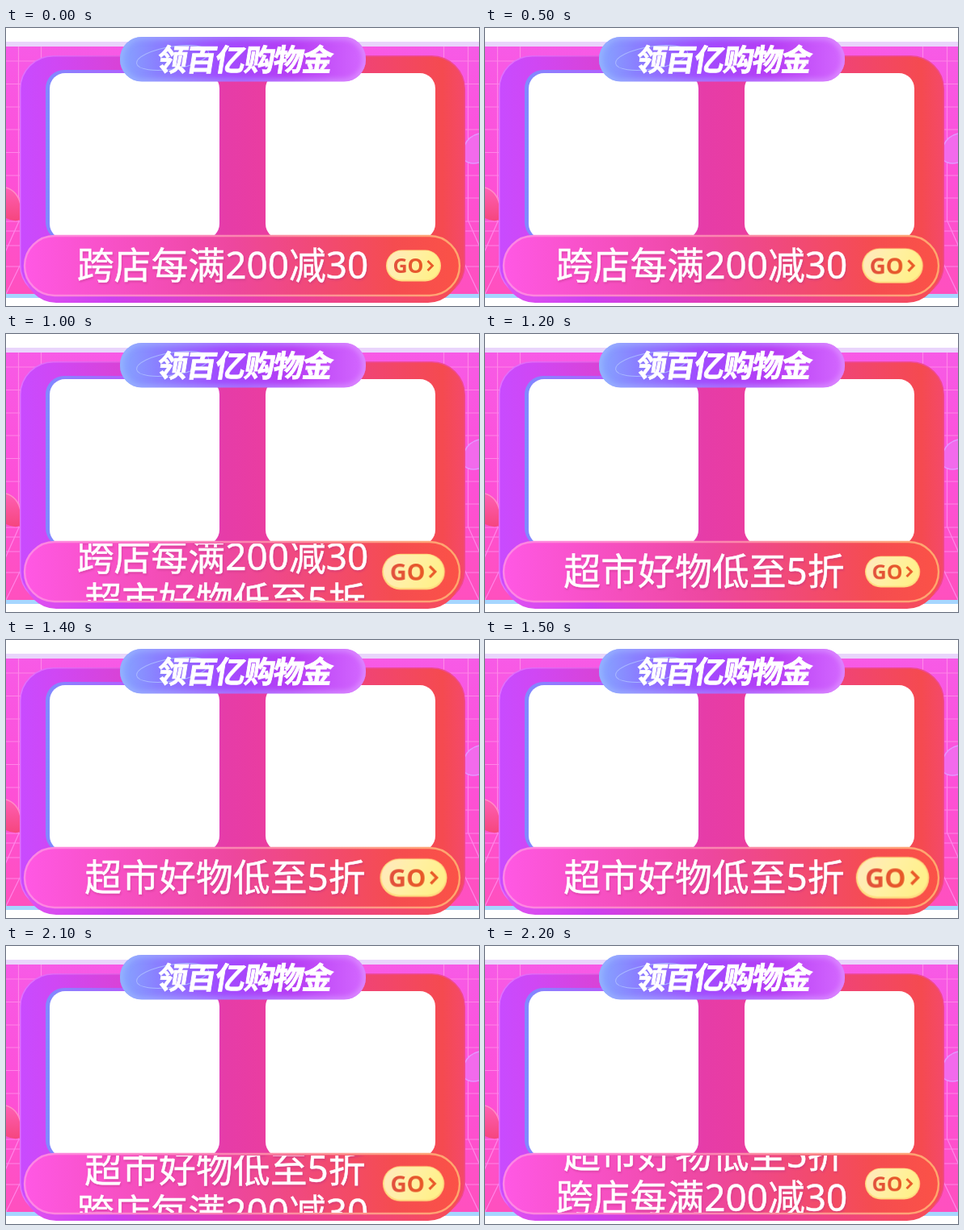
These frames come from a looping animation (585 by 345 pixels, 2.3 s). An HTML page:

```html
<!DOCTYPE html>
<html lang="zh-CN">
<head>
<meta charset="utf-8">
<title>领百亿购物金</title>
<style>
  html, body { margin: 0; width: 100%; height: 100%; overflow: hidden; background: #fff; }
  svg { display: block; width: 585px; height: 345px; }
  text { font-family: "Noto Sans", "Noto Sans CJK SC", "Noto Sans CJK", sans-serif; }
  .title { font: 900 37.4px "Noto Sans CJK SC", "Noto Sans CJK", sans-serif; letter-spacing: -1.5px; fill: #fff; stroke: #fff; stroke-width: .9; }
  .offer { font-size: 45.9px; fill: #fff; stroke: #fff; stroke-width: .5; text-anchor: middle; }
  .offer text { filter: drop-shadow(1px 2px 1px #b9308066); }
  .go text { font: 700 25px "Open Sans", sans-serif; fill: url(#goText); }

  .first, .second, .go { animation: 2300ms step-end infinite; }
  .first { animation-name: first; }
  .second { animation-name: second; }
  .go { animation-name: pulse; transform-origin: 504px 295px; }

  @keyframes first {
    0% { transform: translateY(0); }
    43.47% { transform: translateY(-18px); }
    47.82% { transform: translateY(-36px); }
    52.17% { transform: translateY(-80px); }
    91.30% { transform: translateY(36px); }
    95.65% { transform: translateY(18px); }
    100% { transform: translateY(0); }
  }
  @keyframes second {
    0% { transform: translateY(80px); }
    43.47% { transform: translateY(36px); }
    47.82% { transform: translateY(18px); }
    52.17% { transform: translateY(0); }
    91.30% { transform: translateY(-18px); }
    95.65% { transform: translateY(-36px); }
    100% { transform: translateY(80px); }
  }
  @keyframes pulse {
    0% { transform: scale(1); }
    21.73% { transform: scale(1.11); }
    26.08% { transform: scale(1.22); }
    30.43% { transform: scale(1.33); }
    39.13% { transform: scale(1.24); }
    43.47% { transform: scale(1.14); }
    47.82% { transform: scale(1.07); }
    52.17% { transform: scale(1); }
    56.52% { transform: scale(1.11); }
    60.86% { transform: scale(1.22); }
    65.21% { transform: scale(1.33); }
    82.60% { transform: scale(1.24); }
    91.30% { transform: scale(1.12); }
    95.65%, 100% { transform: scale(1); }
  }
</style>
</head>
<body>
<svg viewBox="0 0 585 345">
  <defs>
    <linearGradient id="backdrop" x2="0" y2="1">
      <stop stop-color="#f75ae6"/><stop offset=".5" stop-color="#fd50d8"/><stop offset="1" stop-color="#ff50be"/>
    </linearGradient>
    <linearGradient id="panel">
      <stop stop-color="#c84bff"/><stop offset=".08" stop-color="#d047f4"/>
      <stop offset=".46" stop-color="#e63ca8"/><stop offset=".56" stop-color="#ea3da0"/>
      <stop offset=".95" stop-color="#f54a50"/><stop offset="1" stop-color="#f4496a"/>
    </linearGradient>
    <linearGradient id="panelEdge">
      <stop stop-color="#e070ff"/><stop offset=".5" stop-color="#e84bc0"/><stop offset="1" stop-color="#f0488c"/>
    </linearGradient>
    <linearGradient id="cardEdge">
      <stop stop-color="#7f8aff"/><stop offset=".45" stop-color="#b060ff"/><stop offset="1" stop-color="#e03cb8"/>
    </linearGradient>
    <linearGradient id="ribbon">
      <stop stop-color="#86a6ff"/><stop offset=".15" stop-color="#8a80ff"/><stop offset=".4" stop-color="#a04cff"/>
      <stop offset=".7" stop-color="#b63cf4"/><stop offset="1" stop-color="#d468ff"/>
    </linearGradient>
    <linearGradient id="ribbonEdge">
      <stop stop-color="#96b4ff"/><stop offset=".5" stop-color="#a878ff"/><stop offset="1" stop-color="#e08cff"/>
    </linearGradient>
    <linearGradient id="bar">
      <stop stop-color="#ff58e4"/><stop offset=".48" stop-color="#ed479e"/>
      <stop offset=".85" stop-color="#f54c50"/><stop offset="1" stop-color="#fb5247"/>
    </linearGradient>
    <linearGradient id="barEdge">
      <stop stop-color="#ff86e6"/><stop offset=".5" stop-color="#fb86b0"/><stop offset="1" stop-color="#ffa86c"/>
    </linearGradient>
    <linearGradient id="barRim">
      <stop stop-color="#e052f0"/><stop offset=".2" stop-color="#cc40f0"/>
      <stop offset=".55" stop-color="#e83ca8"/><stop offset="1" stop-color="#f74e54"/>
    </linearGradient>
    <linearGradient id="goFill" x2="1" y2=".3">
      <stop stop-color="#ffe8c0"/><stop offset=".5" stop-color="#fff0a6"/><stop offset="1" stop-color="#fff08c"/>
    </linearGradient>
    <linearGradient id="goText">
      <stop stop-color="#e2503f"/><stop offset="1" stop-color="#e95b26"/>
    </linearGradient>
    <linearGradient id="candy" x2="0" y2="1">
      <stop stop-color="#ff5fb4"/><stop offset="1" stop-color="#f5467e"/>
    </linearGradient>
    <filter id="soft"><feGaussianBlur stdDeviation="3"/></filter>
    <clipPath id="stageBand"><rect y="23" width="585" height="307"/></clipPath>
    <clipPath id="ribbonShape"><rect x="141" y="11" width="304" height="55.500" rx="27"/></clipPath>
    <clipPath id="barInside"><rect x="25" y="260" width="534" height="70.500" rx="35"/></clipPath>
  </defs>

  <!-- backdrop -->
  <rect y="17" width="585" height="318" fill="#e9d5fb"/>
  <rect y="329" width="585" height="6" fill="#a6d6ff"/>
  <g clip-path="url(#stageBand)">
    <rect y="23" width="585" height="307" fill="url(#backdrop)"/>
    <g fill="none" stroke="#ff86e8" stroke-width="1.200">
      <path d="M0 41H585M0 69.500H585M0 98H585M0 126H585M0 154.500H585M0 183H585M0 211H585M0 240H585"/>
      <path d="M15.500 23V240M43.500 23V40M541.500 23V40M571.500 23V240"/>
      <path d="M16 240L-4 285M44 240L0 330M572 240L592 285M542 240L585 330M0 252H585M0 270H585M0 296H585"/>
    </g>
    <path d="M0 198Q14 202 18 219V238Q10 241 0 236Z" fill="url(#candy)"/>
    <path d="M0 198Q14 202 18 219" fill="none" stroke="#ff8cc8" stroke-width="1.500"/>
    <path d="M585 131Q572 134 567 146V164Q574 170 585 167Z" fill="#f26aec"/>
    <path d="M585 131Q572 134 567 146M567 164Q574 170 585 167" fill="none" stroke="#e596ff" stroke-width="1.500"/>
  </g>

  <!-- panel and cards -->
  <rect x="17.700" y="34.700" width="549.600" height="300" rx="41" fill="url(#panel)" stroke="url(#panelEdge)" stroke-width="1.500"/>
  <rect x="49" y="52" width="216" height="212" rx="23" fill="url(#cardEdge)"/>
  <g fill="#fff">
    <rect x="54" y="56" width="210" height="206" rx="19"/>
    <rect x="321" y="56" width="210" height="206" rx="19"/>
  </g>

  <!-- ribbon -->
  <g clip-path="url(#ribbonShape)">
    <rect x="141" y="11" width="304" height="55.500" fill="url(#ribbon)"/>
    <rect x="141" y="11" width="304" height="55.500" rx="27" fill="none" stroke="url(#ribbonEdge)" stroke-width="7" filter="url(#soft)"/>
  </g>
  <ellipse cx="206" cy="37" rx="45" ry="14" transform="rotate(-9 206 37)" fill="none" stroke="#a9b8ff"/>
  <text class="title" transform="translate(185.500 53) skewX(-9)">领百亿购物金</text>

  <!-- offer bar -->
  <rect x="23" y="262" width="538" height="79" rx="39" fill="url(#barRim)"/>
  <rect x="23" y="258" width="538" height="74" rx="37" fill="url(#bar)" stroke="url(#barEdge)" stroke-width="2.400"/>
  <g class="offer" clip-path="url(#barInside)">
    <g class="first"><text x="268" y="311">跨店每满200减30</text></g>
    <g class="second"><text x="271" y="311">超市好物低至5折</text></g>
  </g>

  <g class="go">
    <rect x="470" y="275.500" width="68" height="39" rx="19.500" fill="#ffdc80"/>
    <rect x="471.500" y="276.500" width="65" height="36" rx="18" fill="url(#goFill)"/>
    <text x="478.500" y="304">GO</text>
    <path d="M521.500 289L527.500 295L521.500 301" fill="none" stroke="#e95b2a" stroke-width="2.800"/>
  </g>
</svg>
</body>
</html>
```
